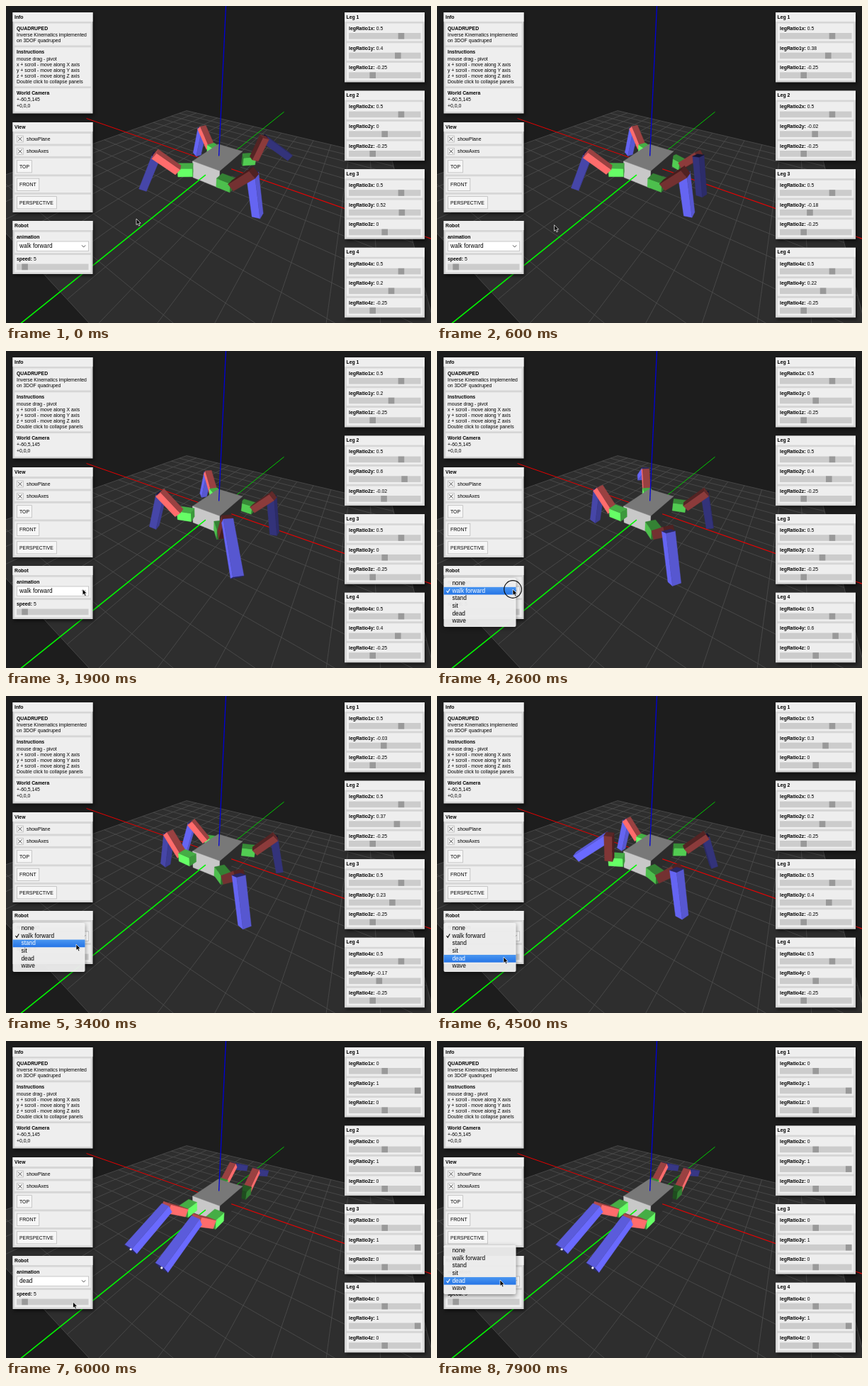
An HTML page with a canvas for the animation above (8 s loop, 600x447 px).

```html
<!DOCTYPE html>
<html lang="en">
<head>
<meta charset="utf-8">
<title>Quadruped</title>
<style>
  html, body { margin: 0; width: 100%; height: 100%; overflow: hidden; background: #1d1d1d; }
  canvas, svg { position: absolute; left: 0; top: 0; width: 600px; height: 447px; }
  text { font: 6.85px "Liberation Sans", Arial, sans-serif; fill: #000; white-space: pre; }
  .b { font-weight: bold; }
  .m { font-size: 8.3px; }
  .panel { fill: #d6d6d6; filter: drop-shadow(2px 3px 2px rgba(0,0,0,.5)); }
  .row { fill: #eee; }
  .track { fill: #ccc; }
  .knob { fill: #999; }
  .field { fill: #f6f6f6; stroke: #b4b4b4; stroke-width: .7; }
  .line { fill: none; stroke: #444; stroke-width: .9; }
  .menu { fill: #f3f3f3; fill-opacity: .94; filter: drop-shadow(0 2px 3px rgba(0,0,0,.5)); }
</style>
</head>
<body>
<canvas id="scene" width="600" height="447"></canvas>
<svg id="ui" viewBox="0 0 600 447"></svg>
<script>
const LOOP = 8000, STEP = 100;
const clamp = v => Math.max(0, Math.min(1, v));
const mix = (a, b, k) => a + (b - a) * k;
const ramp = (t, from, length) => clamp((t - from) / length);

// ---- panels ----
const ui = document.getElementById('ui');
function add(tag, attrs, parent = ui) {
  const el = document.createElementNS('http://www.w3.org/2000/svg', tag);
  for (const key in attrs) el.setAttribute(key, attrs[key]);
  return parent.appendChild(el);
}
const rect = (x, y, width, height, cls, parent) =>
  add('rect', { x, y, width, height, class: cls }, parent);
function text(x, mid, str, cls = '', parent = ui) {
  const el = add('text', { x, y: mid + 2.4, class: cls }, parent);
  el.textContent = str;
  return el;
}
function panel(x, y, height, title, rows) {
  rect(x, y, 113, height, 'panel');
  rect(x, y, 113, 13, 'row');
  text(x + 2.5, y + 6.2, title, 'b');
  for (const [top, h] of rows) rect(x + 2.8, top, 107.4, h, 'row');
}
function slider(x, mid, name) {
  const label = text(x, mid, '');
  const bold = add('tspan', { class: 'b' }, label);
  bold.textContent = name + ':';
  const value = add('tspan', {}, label);
  rect(x, mid + 6.6, 101.5, 8.6, 'track');
  const knob = rect(0, mid + 6.6, 8.6, 8.6, 'knob');
  return (v, at) => {
    value.textContent = ' ' + (+v.toFixed(2) || 0);
    knob.setAttribute('x', at - 4.3);
  };
}

panel(9.5, 9, 142.5, 'Info', [[24.5, 31], [58.3, 55], [116, 33]]);
[['QUADRUPED', 31.5, 'b'], ['Inverse Kinematics implemented', 41], ['on 3DOF quadruped', 49],
 ['Instructions', 65, 'b'], ['mouse drag - pivot', 75], ['x + scroll - move along X axis', 83],
 ['y + scroll - move along Y axis', 91], ['z + scroll - move along Z axis', 98.7],
 ['Double click to collapse panels', 106.5], ['World Camera', 122.7, 'b'],
 ['+-60,5,145', 132], ['+0,0,0', 141]].forEach(([s, y, cls]) => text(15, y, s, cls));

panel(9.5, 164, 127, 'View', [[180, 14.5], [197.4, 14.5], [214.8, 22.7], [240.3, 22.7], [265.8, 22.7]]);
[['showPlane', 187.5], ['showAxes', 205]].forEach(([s, y]) => {
  rect(15.3, y - 4.5, 9, 9, 'field');
  add('path', { d: `M17 ${y - 2.8}l5.6 5.6m0 -5.6l-5.6 5.6`, class: 'line' });
  text(29, y, s);
});
[['TOP', 226.3, 21], ['FRONT', 251.8, 31.5], ['PERSPECTIVE', 277.3, 56]].forEach(([s, y, w]) => {
  rect(15.3, y - 8.6, w, 17.2, 'field');
  text(19, y, s);
});

panel(9.5, 303, 75, 'Robot', [[318.7, 29.5], [351, 24.5]]);
text(15, 325.3, 'animation', 'b');
rect(15.3, 332, 101.4, 13.6, 'field').style.fill = '#fff';
add('path', { d: 'M107 337.3l2.6 2.8l2.6 -2.8', class: 'line' });
const choice = text(19, 338.8, '', 'm');
slider(15, 357, 'speed')(5, 26.6);

const legSliders = [0, 1, 2, 3].map(i => {
  const y = 9 + 110.6 * i;
  panel(478, y, 98.5, 'Leg ' + (i + 1), [0, 1, 2].map(r => [y + 15.6 + 27.7 * r, 24.8]));
  return ['x', 'y', 'z'].map((a, r) => slider(484, y + 22.4 + 27.7 * r, `legRatio${i + 1}${a}`));
});

// ---- drop-down and pointer ----
const ITEMS = ['none', 'walk forward', 'stand', 'sit', 'dead', 'wave'], ROW = 10.7;
const defs = add('defs', {});
const grad = add('linearGradient', { id: 'hi', x1: 0, y1: 0, x2: 0, y2: 1 }, defs);
add('stop', { offset: 0, 'stop-color': '#4a96f0' }, grad);
add('stop', { offset: 1, 'stop-color': '#2474e6' }, grad);
const menu = add('g', {});
add('rect', { x: 9.5, y: -7.5, width: 102, height: 69, rx: 2, class: 'menu' }, menu);
const bar = add('rect', { x: 9.5, width: 102, height: ROW, fill: 'url(#hi)' }, menu);
const items = ITEMS.map((s, i) => text(21.5, i * ROW, s, 'm', menu));
const tick = add('path', { fill: 'none', 'stroke-width': 1.1, d: 'M13.5 0l1.7 2.3l3 -5' }, menu);
const ring = add('circle', { r: 12.3, fill: 'none', stroke: '#111', 'stroke-width': 1.2 });
const arrow = add('path', { d: 'M0 0V8.6L2 6.8L3.4 10L5 9.3L3.6 6.2H6.2Z', fill: '#000', stroke: '#fff', 'stroke-width': .7 });

const PATH = [[0, 184, 300], [400, 184, 300], [1200, 110, 335], [2300, 107, 336], [2700, 107, 336],
  [3400, 99, 350], [4500, 94, 368], [7300, 95, 368], [7600, 89, 337], [LOOP, 89, 337]];
const CLICKS = [[2500, 2700], [4700, 4900], [7600, 7700]];
const MENUS = [[2500, 4900, 327.5, 1], [7700, LOOP, 295.5, 4]];
const during = t => ([from, to]) => t >= from && t < to;

function drawPointer(t) {
  const n = PATH.findIndex(p => p[0] > t), a = PATH[n - 1], b = PATH[n];
  const k = (t - a[0]) / (b[0] - a[0]), x = mix(a[1], b[1], k), y = mix(a[2], b[2], k);
  arrow.setAttribute('transform', `translate(${x} ${y})`);
  ring.setAttribute('cx', x);
  ring.setAttribute('cy', y);
  ring.style.display = CLICKS.some(during(t)) ? '' : 'none';
  choice.textContent = t < 4900 ? 'walk forward' : 'dead';

  const open = MENUS.find(during(t));
  menu.style.display = open ? '' : 'none';
  if (!open) return;
  const [, , top, checked] = open, hot = Math.round((y - top) / ROW);
  menu.setAttribute('transform', `translate(0 ${top})`);
  bar.setAttribute('y', (hot - .5) * ROW);
  items.forEach((el, i) => el.style.fill = i === hot ? '#fff' : '#000');
  tick.setAttribute('transform', `translate(0 ${checked * ROW})`);
  tick.setAttribute('stroke', hot === checked ? '#fff' : '#000');
}

// ---- gait ----
const SWING = [4220, 1440, -45, 2740];
const BASE_Y = [.4, 0, .6, .2];
const DEAD = 5000;
const lying = t => 1 - (1 - ramp(t, DEAD, 500)) ** 2;

function legRatio(i, t) {
  const k = lying(t), w = Math.min(t, DEAD), s = SWING[i], dir = i < 2 ? 1 : -1;
  const shift = SWING.reduce((sum, from) => sum + .2 * ramp(w, from + 600, 400), 0);
  const y = BASE_Y[i] + dir * (.8 * ramp(w, s, 450) - shift);
  const lift = ramp(w, s - 300, 150) - ramp(w, s + 450, 150);
  return { x: mix(.5, 0, k), y: mix(y, 1, k), z: mix(.25 * lift - .25, 0, k), lift };
}

// ---- 3D scene ----
const g = document.getElementById('scene').getContext('2d');
const AX = [[-.852, .297, -.43], [-.522, -.419, .743], [.04, .858, .512]];
const FOCAL = 291, DIST = .9;
const PLANE = [.69, .63], FLOOR = -.035, CELLS = 14;
const BODY = [.064, .099, .042];
const COXA = .06, FEMUR = .105, TIBIA = .175;

const sum = (a, b, k = 1) => a.map((v, i) => v + b[i] * k);
const dot = (a, b) => a[0] * b[0] + a[1] * b[1] + a[2] * b[2];
const cross = (a, b) => [a[1] * b[2] - a[2] * b[1], a[2] * b[0] - a[0] * b[2], a[0] * b[1] - a[1] * b[0]];
const unit = a => a.map(v => v / Math.hypot(...a));
const view = p => [0, 1, 2].map(r => p[0] * AX[0][r] + p[1] * AX[1][r] + p[2] * AX[2][r]);
const project = ([x, y, z]) => [300 + FOCAL * x / (DIST - z), 223.5 - FOCAL * y / (DIST - z)];

function trace(points) {
  g.beginPath();
  points.forEach(p => g.lineTo(...project(p)));
}
function line(a, b, color, width) {
  trace([view(a), view(b)]);
  g.strokeStyle = color;
  g.lineWidth = width;
  g.stroke();
}
const tone = (rgb, k) => `rgb(${rgb.map(v => Math.round(v * k))})`;

// A beam from a to b; side is its horizontal cross direction, tones are [side, top, end].
function beam(a, b, side, w, h, rgb, tones, dotted) {
  const A = view(a), B = view(b), c = sum(A, B).map(v => v / 2);
  const u = unit(sum(B, A, -1)), s = unit(view(side)), n = cross(s, u);
  const dirs = [s, n, u], half = [w, h, Math.hypot(...sum(B, A, -1)) / 2];
  return { depth: c[2], draw() {
    for (let f = 0; f < 6; f++) {
      const i = f >> 1, sign = f % 2 ? 1 : -1, p = (i + 1) % 3, q = (i + 2) % 3;
      const mid = sum(c, dirs[i], sign * half[i]);
      if (sign * dot(dirs[i], sum([0, 0, DIST], mid, -1)) <= 0) continue;
      trace([[1, 1], [1, -1], [-1, -1], [-1, 1]].map(([j, k]) =>
        sum(sum(mid, dirs[p], j * half[p]), dirs[q], k * half[q])));
      g.closePath();
      g.fillStyle = g.strokeStyle = tone(rgb, tones[i]);
      g.lineWidth = .4;
      g.fill();
      g.stroke();
      if (dotted && i === 2 && sign > 0) {
        g.beginPath();
        g.arc(...project(mid), 1.6, 0, 7);
        g.fillStyle = '#fff';
        g.fill();
      }
    }
  } };
}

const GREEN = [102, 255, 102], RED = [255, 108, 108], BLUE = [106, 106, 255], GREY = [200, 200, 200];
// Brightness of [coxa, femur, tibia] per leg, walking and lying.
const WALK_LIGHT = [[1, 1, .66], [.75, .45, .95], [.8, .55, .48], [1, 1, .95]];
const DEAD_LIGHT = [[1, 1, 1], [1, 1, 1], [.5, 1, .52], [.8, 1, .52]];

function legParts(i, r, k) {
  const sx = i === 0 || i === 3 ? 1 : -1, sy = i < 2 ? 1 : -1;
  const hip = [sx * BODY[0], sy * BODY[1], 0];
  const reach = [sx * r.x * .345, sy * r.y * .307, 0], rise = r.z * .36;
  const out = unit(reach), side = [-out[1], out[0], 0];
  const run = Math.hypot(...reach) - COXA;
  const d = Math.min(Math.hypot(run, rise), FEMUR + TIBIA - .001);
  const bend = Math.acos(Math.max(-1, Math.min(1, (FEMUR ** 2 + d * d - TIBIA ** 2) / (2 * FEMUR * d))));
  const pitch = Math.atan2(rise, run) + bend;
  const at = (len, z) => sum(sum(hip, out, len), [0, 0, z]);
  const joint = at(COXA, 0);
  const knee = at(COXA + FEMUR * Math.cos(pitch), FEMUR * Math.sin(pitch));
  const foot = at(COXA + run, rise);
  const light = WALK_LIGHT[i].map((v, j) => mix(v, DEAD_LIGHT[i][j], k));
  if (i === 0) {
    light[1] = mix(light[1], .5, r.lift * (1 - k));
    light[2] = mix(light[2], 1, r.lift);
  }
  const tones = (v, top, end) => [v, v * top, v * end];
  return [
    beam(hip, joint, side, .021, .02, GREEN, tones(light[0], .68, .6)),
    beam(joint, sum(knee, unit(sum(knee, joint, -1)), .008), side, .017, .016, RED, tones(light[1], .6, .7)),
    beam(knee, foot, side, .016, .016, BLUE, tones(light[2], .86, .4), k > .9 && i < 2)
  ];
}

function drawScene(legs, k) {
  g.fillStyle = '#1d1d1d';
  g.fillRect(0, 0, 600, 447);
  const at = (x, y) => [x * PLANE[0], y * PLANE[1], FLOOR];
  trace([at(1, -1), at(1, 1), at(-1, 1), at(-1, -1)].map(view));
  g.fillStyle = '#2e2e2e';
  g.fill();
  for (let i = 0; i <= CELLS; i++) {
    const p = 2 * i / CELLS - 1;
    line(at(p, -1), at(p, 1), '#4e4e4e', .8);
    line(at(-1, p), at(1, p), '#4e4e4e', .8);
  }
  line([1, 0, 0], [0, 0, 0], '#e60000', 1);
  line([0, -1, 0], [0, 0, 0], '#00d000', 1);

  const [bx, by, bz] = BODY;
  const parts = [
    beam([0, -by, .002], [0, by, .002], [1, 0, 0], bx, .04, GREY, [.22, .6, 1]),
    { depth: .01, draw() {
      line([-bx, 0, 0], [-1, 0, 0], '#f00000', 1.1);
      line([0, by, 0], [0, 1, 0], '#00f800', 1.6);
      line([0, 0, bz], [0, 0, 1], '#0000d8', 1.3);
    } }
  ];
  legs.forEach((r, i) => parts.push(...legParts(i, r, k)));
  parts.sort((a, b) => a.depth - b.depth).forEach(p => p.draw());
}

function frame(now) {
  const t = Math.floor(now % LOOP / STEP) * STEP;
  const legs = SWING.map((_, i) => legRatio(i, t));
  drawScene(legs, lying(t));
  legs.forEach((r, i) => {
    legSliders[i][0](r.x, 534.7 + 46.5 * r.x);
    legSliders[i][1](r.y, 534.7 + 46.5 * r.y);
    legSliders[i][2](r.z, 534.7 + 68 * r.z);
  });
  drawPointer(t);
}

const begin = performance.now();
function loop(now) {
  frame(Math.max(0, now - begin));
  requestAnimationFrame(loop);
}
frame(0);
requestAnimationFrame(loop);
</script>
</body>
</html>
```
